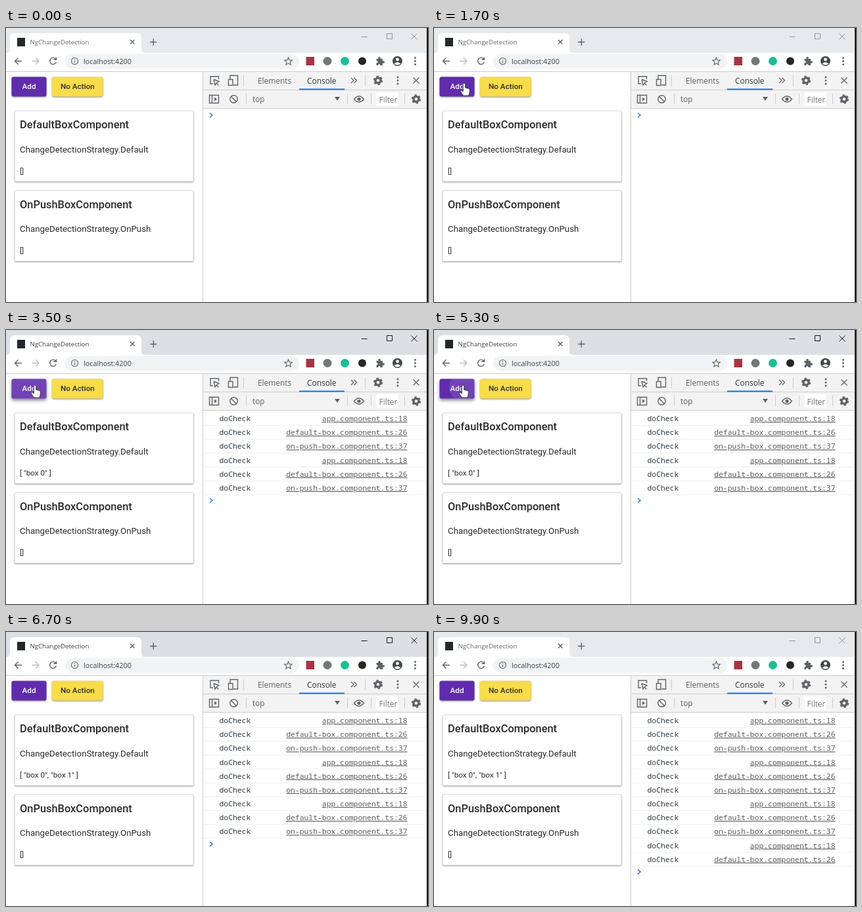
An HTML page that plays this animation: 642x418 px, repeating every 10 s.

```html
<!DOCTYPE html>
<html lang="en">
<head>
<meta charset="utf-8">
<title>Change detection demo</title>
<style>
html, body { margin: 0; width: 100%; height: 100%; overflow: hidden; background: #fff; }
svg { display: block; }
text { white-space: pre; }
.ui { font-family: "Open Sans", "Noto Sans", sans-serif; fill: #5a5f64; }
.page { font-family: Roboto, sans-serif; fill: #2b2b2b; }
.mono { font: 11.38px "Noto Sans Mono", "DejaVu Sans Mono", monospace; fill: #303942; }
.link { text-anchor: end; text-decoration: underline; fill: #5c5c5c; }
.button { font-size: 11.7px; font-weight: 500; }
.line { fill: none; stroke: #5f6368; stroke-width: 1.4; }
.rule { stroke: #ccc; fill: none; }
.card { fill: #fff; stroke: #dedede; filter: drop-shadow(0 1.5px .8px #0006); }
.raised { filter: drop-shadow(0 1.5px 1.2px #0007); }
</style>
</head>
<body>
<svg width="642" height="418" viewBox="0 0 642 418">
  <defs>
    <g id="gear">
      <circle r="4" fill="none" stroke="#5f6368" stroke-width="3.4"/>
      <circle r="6.2" fill="none" stroke="#5f6368" stroke-width="2" stroke-dasharray="3.2 3.29"/>
    </g>
    <g id="dots" fill="#5f6368"><circle cy="-5" r="1.5"/><circle r="1.5"/><circle cy="5" r="1.5"/></g>
    <clipPath id="addClip"><rect x="8.5" y="74.5" width="53" height="30" rx="3"/></clipPath>
  </defs>
  <rect width="642" height="418" fill="#fff"/>

  <!-- Browser frame -->
  <rect id="strip" width="642" height="38"/>
  <path d="M0 38q6 0 6-6V15q0-7 7-7h186q7 0 7 7v17q0 6 6 6z" fill="#fff"/>
  <rect x="17" y="15" width="12" height="13" fill="#24282c"/>
  <text id="title" class="ui" x="36.5" y="24.7" font-size="9.65">NgChangeDetection</text>
  <path class="line" d="M189 18l6.5 6.5m0-6.5l-6.5 6.5M219 21.5h10.5m-5.25-5.25v10.5"/>
  <path id="controls" fill="none" d="M540.5 13.5h9M579.5 8.5h8v8h-8zM616.5 8.5l9 9m0-9l-9 9"/>
  <rect x="90" y="39.5" width="356" height="23" rx="11.5" fill="#f1f3f4"/>
  <g class="line">
    <path d="M24 50.5H13.5m5-5l-5 5l5 5"/>
    <path d="M39.5 50.5H50m-5-5l5 5l-5 5" stroke="#b9bcbf"/>
    <path d="M75.8 47.5a5 5 0 1 0 .6 4.5M76.5 44.5v3.8h-4"/>
    <circle cx="104.5" cy="50.5" r="5" stroke-width="1.1"/>
    <path d="M104.5 49.7v3.5m0-6v1.3" stroke-width="1.2"/>
    <path d="M429.5 45l1.6 3.9 4.2.3-3.2 2.7 1 4.1-3.6-2.2-3.6 2.2 1-4.1-3.2-2.7 4.2-.3z" stroke-width="1.1"/>
  </g>
  <text class="ui" x="118" y="54.5" font-size="10.8" style="fill:#3c4043">localhost:4200</text>
  <rect x="456.5" y="44" width="12.5" height="13" fill="#a63542"/>
  <circle cx="489" cy="50.5" r="6.5" fill="#74787b"/>
  <circle cx="515.5" cy="50.5" r="6.5" fill="#1bbf91"/>
  <circle cx="542" cy="50.5" r="6" fill="#262626"/>
  <path d="M563.5 47h3q-1-3 1.5-3t1.5 3h3.5v3.5q3-1 3 1.5t-3 1.5v3.5h-3.5q0-2-1.7-2t-1.7 2h-2.6v-3.5q2.2 0 2.2-1.7t-2.2-1.7z" fill="#5f6368"/>
  <circle cx="595.5" cy="50.5" r="7.5" fill="#45494d"/>
  <circle cx="595.5" cy="48" r="2.4" fill="#fff"/>
  <path d="M590.5 54.5q5-4.5 10 0q-5 4-10 0z" fill="#fff"/>
  <use href="#dots" x="622.5" y="50.5"/>
  <path class="rule" d="M0 66.5h642"/>

  <!-- Page -->
  <g class="page">
    <rect id="add" x="8.5" y="74.5" width="53" height="30" rx="3" fill="#602cad"/>
    <g clip-path="url(#addClip)"><circle id="ripple" cx="44" cy="87" fill="#fff"/></g>
    <text class="button" x="24.5" y="93.3" style="fill:#fff">Add</text>
    <rect class="raised" x="70" y="74.5" width="77.5" height="30" rx="3" fill="#f8dc49"/>
    <text class="button" x="83" y="93.3">No Action</text>
    <g id="cards"></g>
  </g>

  <!-- Developer tools -->
  <rect x="300" y="67" width="341" height="55" fill="#f3f3f3"/>
  <path class="rule" d="M299.5 67v351M300 94.5h341M300 122.5h341M361.5 72v17M546.5 72v17M365.5 100v16M519.5 100v16M555.5 100v16M606.5 100v16"/>
  <rect x="446" y="92.5" width="69" height="2" fill="#1a73e8"/>
  <g class="ui" font-size="11.9">
    <text x="383" y="84.5">Elements</text>
    <text x="458" y="84.5" style="fill:#333">Console</text>
    <text x="375" y="112.5" font-size="11.7">top</text>
    <rect x="563.5" y="98" width="33" height="21" fill="#fff"/>
    <text x="567.5" y="113.5" style="fill:#757575">Filter</text>
  </g>
  <g class="line">
    <path d="M315 85h-4v-11h12.5v4M316 78.5l2 8.5 2-3 3.5 3.5M316 78.5l8 3-4 2.5"/>
    <path d="M341 78v-5.5h11.5V87H346M338.5 78.5h6.5V87.5h-6.5z"/>
    <path d="M525 76l4 4-4 4m4.5-8l4 4-4 4M619.5 75.5l9 9m0-9l-9 9"/>
    <path d="M309.5 102.5h14v12h-14zM313.5 102.5v12"/>
    <path d="M317 105.5l4 3-4 3z" fill="#5f6368" stroke="none"/>
    <circle cx="346.5" cy="108.5" r="5.8"/><path d="M342.5 104.5l8 8"/>
    <path d="M529.5 108.5q7.5-9 15 0q-7.5 9-15 0z"/>
  </g>
  <circle cx="537" cy="108.5" r="2.6" fill="#5f6368"/>
  <path d="M500 105h8l-4 6z" fill="#5f6368"/>
  <use href="#gear" x="566" y="80"/>
  <use href="#dots" x="596" y="80"/>
  <use href="#gear" x="624" y="108.5"/>
  <g id="rows"></g>
  <path id="prompt" d="M310-3.5l4 3.5-4 3.5" fill="none" stroke="#367cf1" stroke-width="1.6"/>

  <rect x="640" width="2" height="418" fill="#1c1c1c"/>
  <g id="cursor" fill="#fff" stroke="#222" stroke-width=".8" stroke-linejoin="round">
    <path id="arrow" d="M0 0v12.5l2.9-2.7 2 4.7 2-.9-2-4.5h4z"/>
    <path id="hand" transform="translate(0 -1) scale(1.1)" d="M-1.6 1.5q1.6-3 3.2 0v5l4.5 1.1q2 .6 1.7 3l-.9 4.8q-.5 2-2 2H0q-1.5 0-2.3-1.3l-3-4.8q.5-2 2.3-1l1.4 1.5z"/>
  </g>
</svg>
<script>
const LOOP = 10000, STEP = 100, ROW = 21.17;
const $ = id => document.getElementById(id);
const set = (id, attrs) => { for (const k in attrs) $(id).setAttribute(k, attrs[k]); };
const ramp = (t, a, b) => Math.min(1, Math.max(0, (t - a) / (b - a)));
const mix = (a, b, u) => a + (b - a) * u;
const gray = (a, b, u) => `rgb(${a.map((v, i) => Math.round(mix(v, b[i], u)))})`;

$('cards').innerHTML = ['Default', 'OnPush'].map((name, i) => `
  <g transform="translate(0 ${i * 121.5})">
    <rect class="card" x="13.5" y="126.5" width="271.5" height="107.5" rx="1.5"/>
    <text x="21" y="153" font-size="16.4" font-weight="500">${name}BoxComponent</text>
    <text x="21" y="189.5" font-size="13.28">ChangeDetectionStrategy.${name}</text>
    <text id="list${i}" x="21" y="221.7" font-size="11.7">[]</text>
  </g>`).join('');

const files = ['app.component.ts:18', 'default-box.component.ts:26', 'on-push-box.component.ts:37'];
$('rows').innerHTML = Array.from({ length: 11 }, (_, i) => `
  <g transform="translate(0 ${i * ROW})">
    <path d="M300 145.5h340" stroke="#efefef"/>
    <text class="mono" x="324.5" y="139">doCheck</text>
    <text class="mono link" x="610.5" y="139">${files[i % 3]}</text>
  </g>`).join('');
const rows = [...$('rows').children];

// Pointer keys: time, x, y
const path = [[500, 641, 4], [1100, 334, 37], [1600, 46, 85], [2500, 46, 85],
  [2600, 44, 85], [6300, 44, 85], [6700, 641, 36]];

function drawCursor(t) {
  const visible = t >= 500 && t < 6700;
  $('cursor').style.display = visible ? '' : 'none';
  if (!visible) return;
  const i = path.findIndex(key => key[0] > t);
  const [t0, x0, y0] = path[i - 1], [t1, x1, y1] = path[i];
  const u = ramp(t, t0, t1), x = mix(x0, x1, u), y = mix(y0, y1, u);
  const over = x > 8 && x < 62 && y > 75 && y < 105;
  set('cursor', { transform: `translate(${x} ${y})` });
  $('arrow').style.display = over ? 'none' : '';
  $('hand').style.display = over ? '' : 'none';
}

function drawButton(t) {
  const [down, up, end] = t < 5000 ? [3300, 3800, 4100] : [5300, 5900, 6200];
  const held = t >= down && t < up;
  set('ripple', {
    r: 45 * Math.sqrt(ramp(t, down - 100, down + 350)),
    opacity: t < down ? 0 : .11 * (1 - ramp(t, up, end))
  });
  $('add').style.filter = held
    ? 'drop-shadow(0 3px 2.5px #0007)' : 'drop-shadow(0 1.5px 1.2px #0007)';
}

function draw(t) {
  const focus = ramp(t, 2700, 3000) - ramp(t, 9500, 9900);
  set('strip', { fill: gray([231, 234, 237], [220, 224, 229], focus) });
  set('controls', { stroke: gray([145, 145, 145], [20, 20, 20], focus) });
  $('title').style.fill = gray([100, 104, 108], [60, 64, 67], focus);

  const count = t < 2900 ? 0 : t < 3300 ? 3 : t < 5400 ? 6 : t < 9700 ? 9 : 11;
  rows.forEach((row, i) => row.style.display = i < count ? '' : 'none');
  set('prompt', { transform: `translate(0 ${133 + ROW * count})` });
  $('list0').textContent = count < 6 ? '[]' : count < 9 ? '[ "box 0" ]' : '[ "box 0", "box 1" ]';
  drawButton(t);
  drawCursor(t);
}

const start = performance.now();
function tick() {
  const t = (performance.now() - start) % LOOP;
  draw(Math.floor(t / STEP) * STEP);
  requestAnimationFrame(tick);
}
tick();
</script>
</body>
</html>
```
